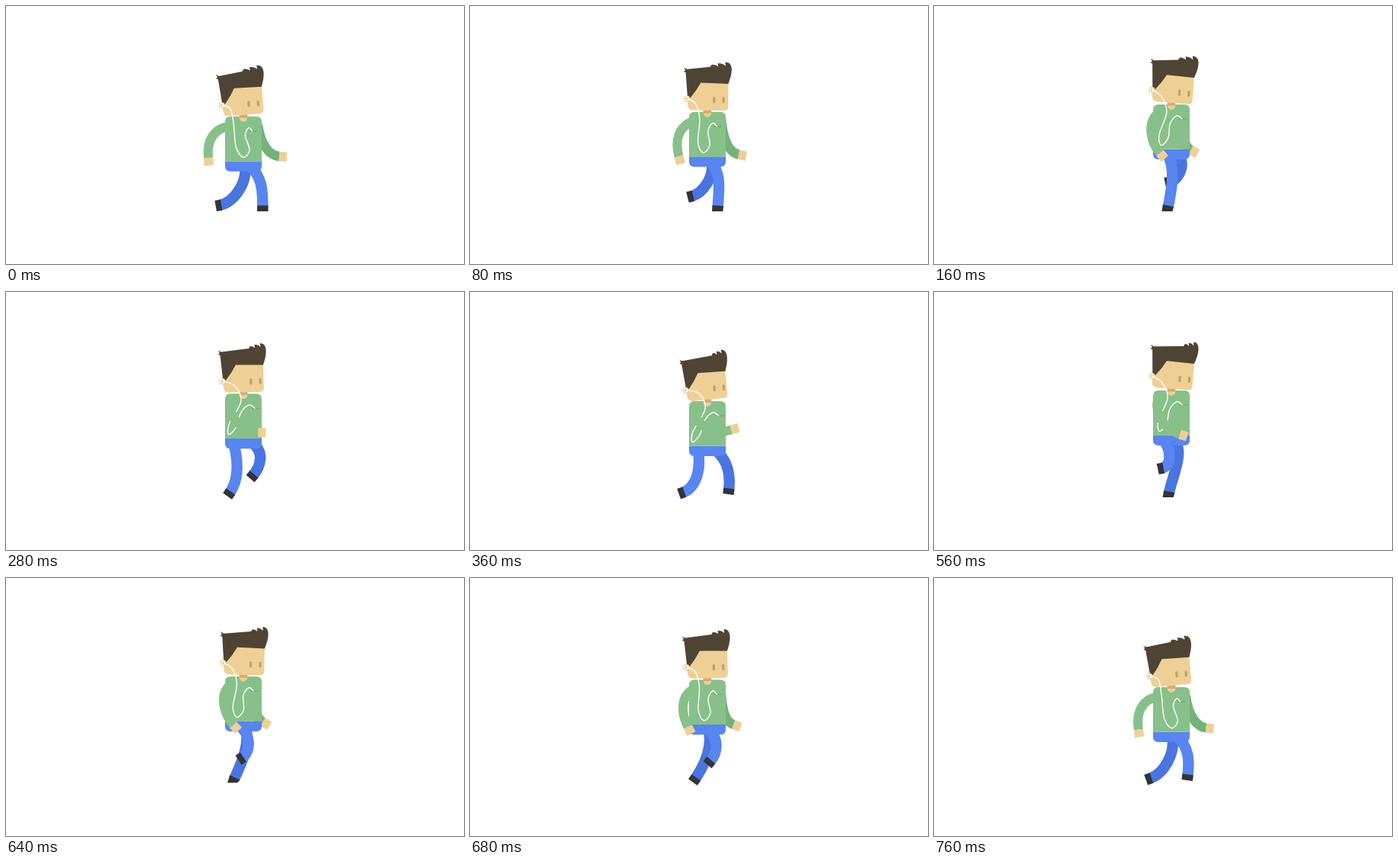
An HTML page that plays this animation: 600 by 338 pixels, repeating every 800 ms.

```html
<!DOCTYPE html>
<html lang="en">
<head>
<meta charset="utf-8">
<title>Walk cycle</title>
<style>
html, body { margin: 0; width: 100%; height: 100%; overflow: hidden; background: #fff; }
svg { display: block; width: 100vw; height: 100vh; }
</style>
</head>
<body>
<svg viewBox="0 0 600 338">
  <g id="farArm"></g>
  <g id="farLeg"></g>
  <g id="nearLeg"></g>
  <g id="torso">
    <path d="M287 58.6H335V65Q335 72 328 72H294Q287 72 287 65Z" fill="#5885f0"/>
    <path d="M287 58.7V7Q287 0 294 0H328Q335 0 335 7V58.7Z" fill="#88c08a"/>
    <path id="pocket" stroke="#72a877" stroke-width="1.4"/>
    <path d="M305.7 -5H316.3V1.5A5.3 5.3 0 0 1 305.7 1.5Z" fill="#eed096"/>
    <path d="M305.7 -5H316.3V1.8H305.7Z" fill="#d2ae76"/>
  </g>
  <g id="head">
    <path d="M-26 -40H27V-7Q27 -2 22 -2H-18Q-26 -2 -26 -10Z" fill="#eed096"/>
    <path id="hair" fill="#4f4433"/>
    <g id="eyes" fill="#c3a06c">
      <rect x="9.4" y="-19.8" width="3.2" height="8" rx="1.5"/>
      <rect x="21.7" y="-19.8" width="3.2" height="8" rx="1.5"/>
    </g>
    <circle cx="-27" cy="-17" r="4" fill="#e6c688"/>
    <circle cx="-27" cy="-17" r="2.4" fill="none" stroke="#fff" stroke-width="1.3"/>
  </g>
  <path id="wire" fill="none" stroke="#fff" stroke-width="1.4" stroke-linecap="round"/>
  <g id="nearArm"></g>
</svg>
<script>
const LOOP = 800, STEP = 40, HALF = LOOP / 2;
const el = id => document.getElementById(id);
const set = (node, attrs) => { for (const k in attrs) node.setAttribute(k, attrs[k]); };

// Cosine wave that peaks at the given time
const wave = (t, peak = 0, period = LOOP) => Math.cos(2 * Math.PI * (t - peak) / period);

const bodyY = t => 136 + 8.8 * wave(t, 0, HALF);
const headTilt = t => -0.5 + 5 * wave(t, 165, HALF);

// One stride of a foot: time, x, y, backward lean of the shin in degrees
const stride = [
  [0, 339, 269, 0],
  [160, 306, 269, 12],
  [280, 291, 267.5, 35],
  [400, 272, 262, 80],
  [480, 281, 250.5, 76],
  [560, 298, 232, 78],
  [680, 315.5, 244.5, 41],
  [760, 335, 265, 7]
];

// Periodic spline through the stride that never overshoots a key
function footAt(t) {
  const n = stride.length;
  const key = (k, j) => stride[(k + n) % n][j] + (j ? 0 : Math.floor(k / n) * LOOP);
  const secant = (k, j) => (key(k + 1, j) - key(k, j)) / (key(k + 1, 0) - key(k, 0));
  const slope = (k, j) => {
    const a = secant(k - 1, j), b = secant(k, j);
    return a * b <= 0 ? 0 : 2 * a * b / (a + b);
  };
  t %= LOOP;
  let i = n - 1;
  while (stride[i][0] > t) i--;
  const h = key(i + 1, 0) - key(i, 0), u = (t - key(i, 0)) / h, v = 1 - u;
  return [1, 2, 3].map(j =>
    v * v * (1 + 2 * u) * key(i, j) + u * u * (3 - 2 * u) * key(i + 1, j) +
    h * u * v * (v * slope(i, j) - u * slope(i + 1, j)));
}

// Unit vector turned from straight down towards the right
function aim(deg) {
  const a = deg * Math.PI / 180;
  return [Math.sin(a), Math.cos(a)];
}

function limb(id, color, width) {
  const ns = 'http://www.w3.org/2000/svg';
  const tube = document.createElementNS(ns, 'path');
  const end = document.createElementNS(ns, 'path');
  set(tube, { fill: 'none', stroke: color, 'stroke-width': width });
  el(id).append(tube, end);
  return { tube, end };
}

const farArm = limb('farArm', '#74b27a', 12.5);
const farLeg = limb('farLeg', '#4a74df', 14.4);
const nearLeg = limb('nearLeg', '#5885f0', 14.4);
const nearArm = limb('nearArm', '#88c08a', 12);

function drawArm({ tube, end }, { shoulder: [sx, sy], elbow: [ex, ey], wrist: [wx, wy], turn, reach }) {
  const [x, y] = aim(turn);
  set(tube, { d: `M${sx} ${sy}c${ex} ${ey} ${wx - x * reach - sx} ${wy - y * reach - sy} ${wx - sx} ${wy - sy}` });
  set(end, {
    d: `M${wx} ${wy}l${x * 10} ${y * 10}`,
    stroke: '#eed096', 'stroke-width': 12.2
  });
}

// t is the leg's own stride time, side is -1 near and 1 far
function drawLeg({ tube, end }, t, hipX, hipY, side) {
  const [footX, fy, lean] = footAt(t);
  const fx = footX + side * (2.7 + 2.2 * wave(t, 600));
  const [x, y] = aim(-lean);
  const raised = 269 - fy, c = wave(t);
  const kx = hipX + 10 + 7 * c + 0.13 * raised;
  const ky = hipY + 20 - 4.5 * c - 0.25 * raised;
  const shin = 25 + 5.5 * wave(t, 170);
  set(tube, {
    d: `M${hipX} ${hipY}C${kx} ${ky} ${fx - x * shin} ${fy - y * shin} ${fx - x * 5} ${fy - y * 5}`
  });

  const r = 7.2, len = 7.6, tx = fx - x * len, ty = fy - y * len;
  // A planted sole lies flat on the ground
  const tip = raised < 1 ? 0 : x * r;
  set(end, {
    d: `M${tx - y * r} ${ty + x * r}L${tx + y * r} ${ty - x * r}` +
      `L${fx + y * r} ${fy - tip}L${fx - y * r} ${fy + tip}Z`,
    fill: '#33333b'
  });
}

function smooth(pts) {
  let d = `M${pts[0]}`;
  for (let i = 0; i < pts.length - 1; i++) {
    const a = pts[i - 1] || pts[i], b = pts[i], c = pts[i + 1], e = pts[i + 2] || c;
    const h1 = b.map((v, k) => v + (c[k] - a[k]) / 6);
    const h2 = c.map((v, k) => v - (e[k] - b[k]) / 6);
    d += `C${h1} ${h2} ${c}`;
  }
  return d;
}

// Resting x, sideways swing and drop below the shoulders
const cord = [
  [300, -6, -10], [308, -10, 10], [292, 9.5, 40], [291.5, 19.5, 53.5],
  [301, 18.5, 44], [307.5, 6, 25], [318, 0, 14.7], [326, -3.5, 19]
];

// Three tufts start at s and reach to the front of the head
function hairPath(s) {
  const x = f => s + (27 - s) * f;
  return 'M-26 -16L-29 -51.5L-31.7 -52.3L-29.6 -54.2L-31.4 -58Q-29 -55.6 -27 -55.6' +
    `L${s} -59Q${x(.03)} -61.5 ${x(.1)} -62Q${x(.32)} -62 ${x(.42)} -59.5` +
    `Q${x(.46)} -62 ${x(.4)} -63.8Q${x(.72)} -64 ${x(.82)} -60.3` +
    `Q${x(.87)} -63 ${x(.8)} -65.2C29 -66 31.3 -61 31.2 -55` +
    'C31 -48 29 -43 27 -37L-9 -38Q-15 -27 -22 -19Z';
}

function draw(t) {
  const y = bodyY(t), tilt = headTilt(t), c = wave(t);

  drawArm(farArm, {
    shoulder: [326 + 4 * c, y + 11],
    elbow: [3 * c, 24],
    wrist: [327 + 31 * c, 185 + 12 * c],
    turn: 50 + 35 * c,
    reach: 14
  });
  drawArm(nearArm, {
    shoulder: [293, y + 12],
    elbow: [-9 - 15 * c, 15 - 10 * c],
    wrist: [307 - 39.5 * wave(t, 3) - 2.5 * wave(t, 3, HALF), 189.5 + 9.5 * c],
    turn: 57.5 - 52 * c,
    reach: 20
  });
  drawLeg(farLeg, t + HALF, 317 - 5 * wave(t, -80), y + 64, 1);
  drawLeg(nearLeg, t, 301 + 10 * c + 8 * c * c, y + 64, -1);

  set(el('torso'), { transform: `translate(0 ${y})` });
  set(el('pocket'), { d: `M${320.5 - 3 * c} 19.2h11.5` });
  set(el('head'), { transform: `translate(311 ${y}) rotate(${tilt})` });
  set(el('eyes'), { transform: `translate(${-1.4 - 1.2 * c} 0)` });
  set(el('hair'), { d: hairPath(8 - 5 * wave(t, 60)) });

  const [sn, cs] = aim(tilt), swing = ((1 + wave(t, -25)) / 2) ** 2;
  const ear = [311 - 26 * cs + 17 * sn, y - 26 * sn - 17 * cs];
  set(el('wire'), { d: smooth([ear, ...cord.map(([x, dx, drop]) => [x + dx * swing, y + drop])]) });
}

const start = performance.now();
function tick() {
  const t = Math.max(0, performance.now() - start) % LOOP;
  draw(Math.floor(t / STEP) * STEP);
  requestAnimationFrame(tick);
}
tick();
</script>
</body>
</html>
```
